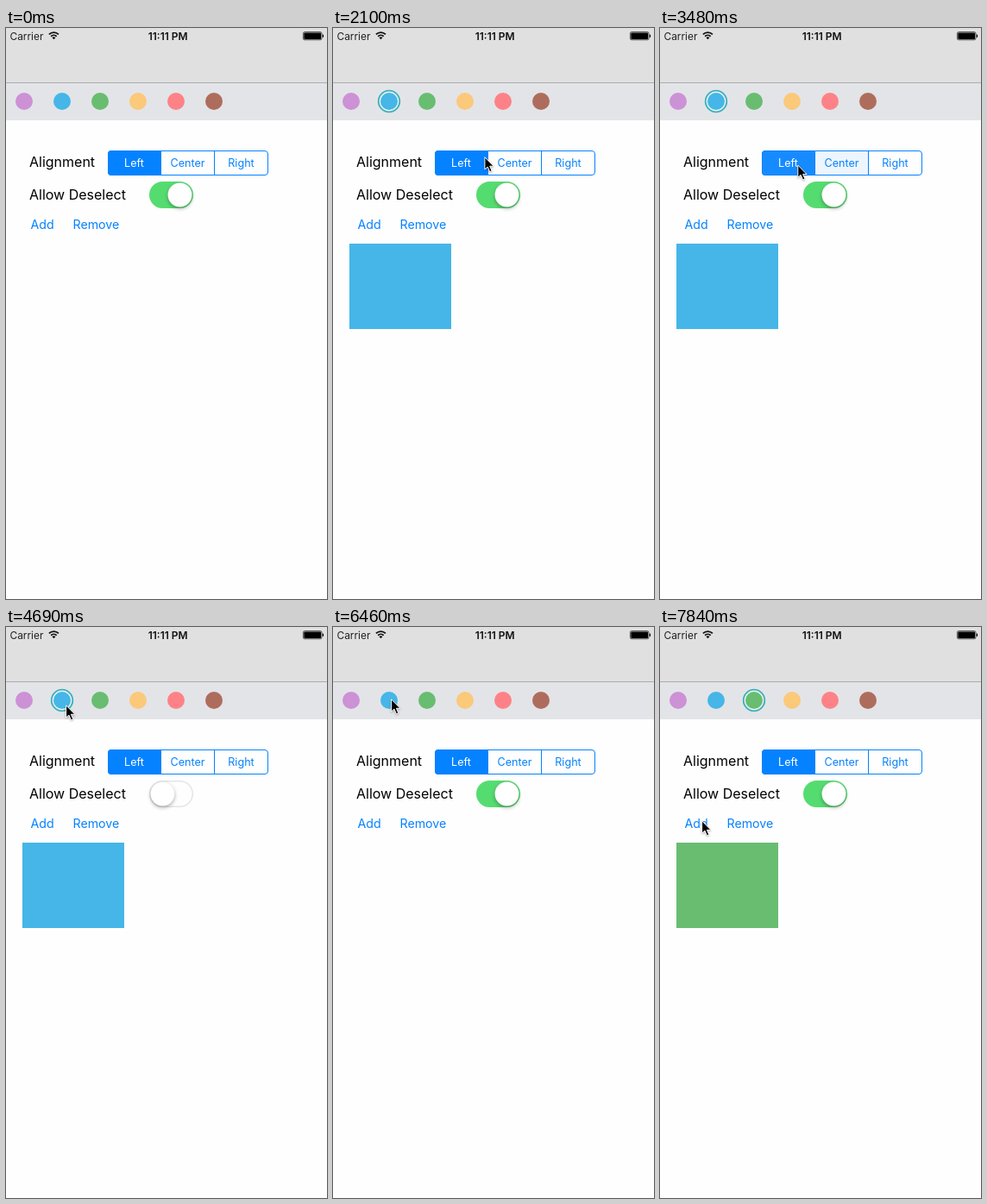
Recreate the animation shown at these times as an HTML page with a canvas. Size 372x662 px, loop 8 s.

```html
<!DOCTYPE html>
<html lang="en">
<head>
<meta charset="utf-8">
<title>Color picker demo</title>
<style>
html, body { margin: 0; width: 100%; height: 100%; overflow: hidden; background: #fefefe; }
canvas, svg { position: absolute; left: 0; top: 0; width: 372px; height: 662px; }
text { font-family: Inter, Roboto, sans-serif; }
.label { font-size: 16px; fill: #000; }
.button { font-size: 14.2px; fill: #0582ff; }
.seg { font-size: 12.6px; text-anchor: middle; }
.status { font-size: 11.9px; fill: #222; }
.clock { font-size: 12px; font-weight: 600; text-anchor: middle; fill: #111; }
</style>
</head>
<body>
<canvas id="stage"></canvas>
<svg viewBox="0 0 372 662">
  <text class="status" x="4.5" y="13.5">Carrier</text>
  <text class="clock" x="187.7" y="13.5">11:11 PM</text>
  <text class="label" x="27" y="161">Alignment</text>
  <text class="label" x="27" y="199">Allow Deselect</text>
  <text class="seg" x="148.5" y="161">Left</text>
  <text class="seg" x="210.5" y="161">Center</text>
  <text class="seg" x="272.5" y="161">Right</text>
  <text class="button" x="28.5" y="232.5">Add</text>
  <text class="button" x="77.5" y="232.5">Remove</text>
  <path id="cursor" d="M0 0V14.3L3.3 11.3L5.8 17L8.2 16L5.8 10.5H10.3Z"
    fill="#000" stroke="#fff" stroke-width="1" style="filter:drop-shadow(0 1px 1px rgba(0,0,0,.3))"/>
</svg>
<script>
const W = 372, H = 662, LOOP = 8000;
const BLUE = [5, 130, 255], GREEN = [85, 220, 112], GREY = [229, 229, 229], WHITE = [254, 254, 254];
const COLORS = ['#cd91d6', '#45b6e7', '#68bd71', '#fbc97a', '#fd8287', '#ae6d5c'];

// Selected swatch: [time, index], -1 for none
const PICKS = [[0, -1], [850, 0], [1400, 1], [6400, -1], [7050, 2]];

// Pointer path: [time, x, y]
const PATH = [
  [0, -16, 124], [60, -16, 124], [520, 20, 86], [880, 20, 86],
  [1220, 58, 87], [1560, 58, 87], [2140, 183, 153], [2280, 187, 156],
  [2760, 187, 156], [2940, 157, 156], [3440, 157, 156], [3700, 190, 190],
  [4200, 190, 190], [4640, 69, 90], [4700, 69, 90], [4860, 61, 80],
  [5110, 61, 80], [5420, 190, 190], [5620, 190, 190], [6280, 67, 83],
  [6560, 67, 83], [6900, 108, 86], [7080, 108, 86], [7320, 131, 150],
  [7550, 110, 216], [7840, 48, 224], [8000, 48, 224]
];

const canvas = document.getElementById('stage');
const ctx = canvas.getContext('2d');
const cursor = document.getElementById('cursor');
const segTexts = document.querySelectorAll('.seg');
const dpr = window.devicePixelRatio || 1;
canvas.width = W * dpr;
canvas.height = H * dpr;

const ramp = (t, a, b) => Math.min(1, Math.max(0, (t - a) / (b - a)));
const smooth = u => u * u * (3 - 2 * u);
const mix = (a, b, u) => `rgb(${a.map((v, i) => Math.round(v + (b[i] - v) * u))})`;

// Velocity at a path point; zero beside a pause
function slope(i, k) {
  const a = PATH[i - 1], b = PATH[i], c = PATH[i + 1];
  if (!a || !c) return 0;
  const still = (p, q) => p[1] === q[1] && p[2] === q[2];
  return still(a, b) || still(b, c) ? 0 : (c[k] - a[k]) / (c[0] - a[0]);
}

function pointerAt(t) {
  let i = 0;
  while (i < PATH.length - 2 && PATH[i + 1][0] <= t) i++;
  const a = PATH[i], b = PATH[i + 1], d = b[0] - a[0], u = ramp(t, a[0], b[0]);
  return [1, 2].map(k =>
    a[k] + (b[k] - a[k]) * smooth(u) +
    d * u * (1 - u) * ((1 - u) * slope(i, k) - u * slope(i + 1, k)));
}

function pill(x, y, w, h, r, fill) {
  ctx.beginPath();
  ctx.roundRect(x, y, w, h, r);
  ctx.fillStyle = fill;
  ctx.fill();
}

function disc(x, y, r, fill) {
  ctx.beginPath();
  ctx.arc(x, y, r, 0, 7);
  ctx.fillStyle = fill;
  ctx.fill();
}

function rect(x, y, w, h, fill) {
  ctx.fillStyle = fill;
  ctx.fillRect(x, y, w, h);
}

function drawStatus() {
  rect(0, 0, W, 63, '#e0e0e0');
  rect(0, 63, W, 1, '#adadad');
  rect(0, 64, W, 43, '#e3e4e8');
  ctx.strokeStyle = '#111';
  ctx.lineWidth = 1.8;
  for (const r of [4.6, 7.8]) {
    ctx.beginPath();
    ctx.arc(55.4, 13, r, -Math.PI * 0.75, -Math.PI * 0.25);
    ctx.stroke();
  }
  ctx.beginPath();
  ctx.moveTo(55.4, 13.3);
  ctx.arc(55.4, 13.3, 2.8, -Math.PI * 0.75, -Math.PI * 0.25);
  ctx.fillStyle = '#111';
  ctx.fill();
  ctx.lineWidth = 0.7;
  ctx.beginPath();
  ctx.roundRect(344.4, 4.6, 21.6, 9.2, 1.8);
  ctx.stroke();
  pill(345.3, 5.5, 19.8, 7.4, 1, '#000');
  pill(366.7, 7.4, 1.4, 3.6, 0.7, '#111');
}

function drawSwatches(t) {
  const [since, picked] = PICKS.filter(p => p[0] <= t).pop();
  const shift = t >= 2460 && t < 3360 ? 55.5 : 0;
  COLORS.forEach((color, i) => {
    const x = 21 + 44 * i + shift, y = 85;
    if (i === picked) {
      const r = 12.3 + 4 * (1 - ramp(t, since, since + 260)) ** 2;
      disc(x, y, r, '#eff1f3');
      ctx.strokeStyle = '#39b2ba';
      ctx.lineWidth = 1.8;
      ctx.stroke();
    }
    disc(x, y, 10, color);
  });
  if (picked >= 0) rect(19, 250, 118, 99, COLORS[picked]);
}

function drawSegments(t) {
  const toCenter = ramp(t, 2460, 2590), toLeft = ramp(t, 3360, 3490);
  const press = (a, b) => t >= a && t < b ? 0.12 : 0;
  const levels = [
    Math.max(1 - toCenter + toLeft, press(3180, 3400)),
    Math.max(toCenter - toLeft, press(2340, 2500)),
    0
  ];
  ctx.save();
  ctx.beginPath();
  ctx.roundRect(118, 142, 186, 29, 4);
  ctx.clip();
  levels.forEach((v, i) => {
    rect(118 + 62 * i, 142, 62, 29, mix(WHITE, BLUE, v));
    segTexts[i].setAttribute('fill', mix(BLUE, [255, 255, 255], v > 0.5 ? 1 : 0));
  });
  ctx.restore();
  rect(179, 142, 1, 29, mix(BLUE, BLUE, 0));
  rect(241, 142, 1, 29, mix(BLUE, BLUE, 0));
  ctx.strokeStyle = mix(BLUE, BLUE, 0);
  ctx.lineWidth = 1;
  ctx.beginPath();
  ctx.roundRect(118.5, 142.5, 185, 28, 3.5);
  ctx.stroke();
}

function drawSwitch(t) {
  const off = smooth(ramp(t, 4190, 4440)) - smooth(ramp(t, 5600, 5850));
  const press = ramp(t, 4060, 4160) - ramp(t, 4200, 4400) +
    ramp(t, 5460, 5560) - ramp(t, 5620, 5820);
  pill(166, 178, 51, 31, 15.5, mix(GREEN, GREY, off));
  if (off > 0.01) {
    const w = 48 * off, h = 28 * off;
    pill(191.5 - w / 2, 193.5 - h / 2, w, h, h / 2, '#fefefe');
  }
  const w = 28 + 6 * press;
  const x = 167.5 + (48 - w) * (1 - off);
  ctx.save();
  ctx.shadowColor = 'rgba(0,0,0,.3)';
  ctx.shadowBlur = 4 * dpr;
  ctx.shadowOffsetY = 2 * dpr;
  pill(x, 179.5, w, 28, 14, '#fff');
  ctx.restore();
  ctx.strokeStyle = 'rgba(0,0,0,.08)';
  ctx.lineWidth = 0.5;
  ctx.stroke();
}

function draw(t) {
  ctx.setTransform(dpr, 0, 0, dpr, 0, 0);
  rect(0, 0, W, H, '#fefefe');
  drawStatus();
  drawSwatches(t);
  drawSegments(t);
  drawSwitch(t);
  const [x, y] = pointerAt(t);
  cursor.setAttribute('transform', `translate(${x + 0.6} ${y + 0.8})`);
}

const start = performance.now();
function tick() {
  draw((performance.now() - start) % LOOP);
  requestAnimationFrame(tick);
}
tick();
</script>
</body>
</html>
```
